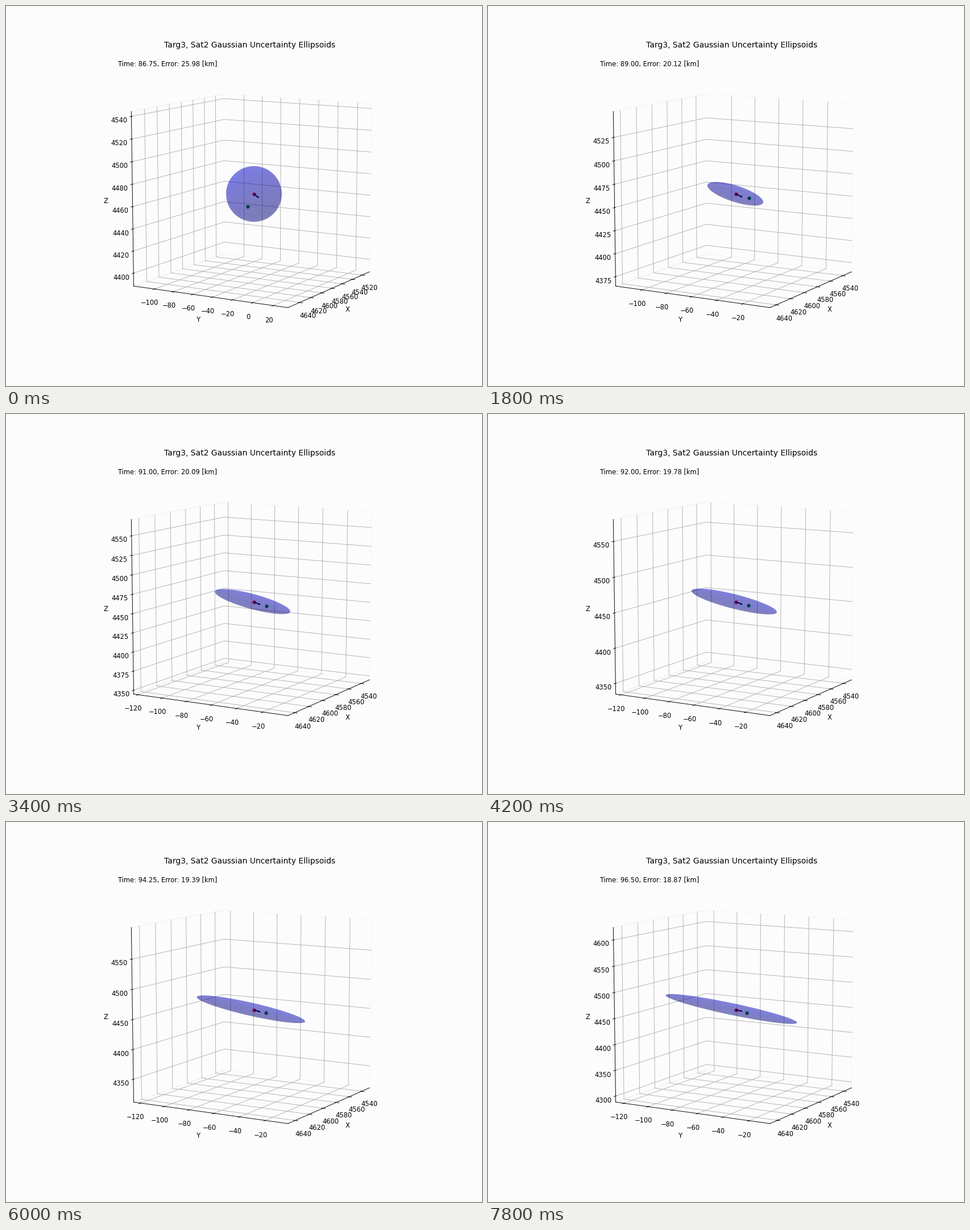
A matplotlib script that plays this animation: 837x669 px, repeating every 8 s.

```python
import numpy as np
import matplotlib.pyplot as plt
from matplotlib.animation import FuncAnimation
from matplotlib.ticker import FixedLocator, MaxNLocator

WIDTH, HEIGHT, DPI = 837, 669, 83.2
FRAMES, INTERVAL = 40, 200
START, STEP = 86.75, 0.25
ELEV, AZIM = 10, 30
BOX = 0.55          # half side of the drawn cube
PX = 278.45         # pixels per cube unit at the centre
MARGIN = 24 / 25    # part of the box that carries ticks

# a few readings of the error after the first filter update
ERROR_STEPS = [1, 5, 12, 17, 21, 30, 39]
ERRORS = [20.02, 20.07, 20.15, 20.09, 19.78, 19.39, 18.87]

e, a = np.radians([ELEV, AZIM])
VIEW = np.array([   # rows: right, up, towards the camera
    [-np.sin(a), np.cos(a), 0],
    [-np.sin(e) * np.cos(a), -np.sin(e) * np.sin(a), np.cos(e)],
    [np.cos(e) * np.cos(a), np.cos(e) * np.sin(a), np.sin(e)],
])

u, w = np.meshgrid(np.linspace(0, 2 * np.pi, 41),
                   np.linspace(0, np.pi, 31), indexing="ij")
SPHERE = np.tensordot(VIEW, np.array(
    [np.cos(u) * np.sin(w), np.sin(u) * np.sin(w), np.cos(w)]), 1)


def prior():
    """Spherical first guess, before any measurement."""
    return dict(centre=np.array([4582.6, -44.0, 4466.3]),
                half=np.full(3, 78.1),
                axes=49 * np.eye(3),
                truth=[-10.5, -22, 0],
                tip=[8.2, -6.5, 4],
                error=25.98)


def estimate(k):
    """Filtered state: the long axis keeps growing along the line of sight.

    centre and half are in km, the rest in camera-space pixels.
    """
    wide = 61.4
    tall = 70.6 + 2.49 * k + 6 * np.exp(-k / 5)
    long_axis = [25 + 2.27 * k, -13 - 0.29 * k, -25 - 4.4 * k]
    return dict(centre=np.array([4585.4 + 0.56 * k ** 0.5,
                                 -58.09 - 0.57 * k ** 0.7,
                                 4459.4 - 0.09 * k]),
                half=np.array([wide, wide, tall]),
                axes=np.array([long_axis, [0, 15 - 0.135 * k, 0],
                               [18.5, 0, 0]]).T,
                truth=[23.3 - 0.0029 * k ** 2, -8.3 + 0.09 * k, 0],
                tip=[10.8, -6.2 + 0.1 * k, 4],
                error=np.interp(k, ERROR_STEPS, ERRORS))


fig = plt.figure(figsize=((WIDTH + 0.01) / DPI, (HEIGHT + 0.01) / DPI),
                 dpi=DPI, facecolor="#fcfcfc")
ax = fig.add_subplot(projection="3d", computed_zorder=False,
                     facecolor="#fcfcfc")
ax.set_box_aspect((1, 1, 1))
ax.view_init(ELEV, AZIM)
ax.set_title("Targ3, Sat2 Gaussian Uncertainty Ellipsoids")
ax.set(xlabel="X", ylabel="Y", zlabel="Z")
AXES = (ax.xaxis, ax.yaxis, ax.zaxis)
SETTERS = (ax.set_xlim, ax.set_ylim, ax.set_zlim)
for axis in AXES:
    axis.pane.fill = False
note = ax.text2D(0.05, 0.95, "", transform=ax.transAxes)
locator = MaxNLocator(9, steps=[1, 2, 2.5, 5, 10])
parts = []


def set_range(axis, set_lim, mid, half):
    lo, hi = mid - half * MARGIN, mid + half * MARGIN
    ticks = locator.tick_values(lo, hi)
    axis.set_major_locator(FixedLocator(ticks[(ticks >= lo) & (ticks <= hi)]))
    set_lim(mid - half, mid + half)


def update(k):
    while parts:
        parts.pop().remove()
    s = estimate(k) if k else prior()
    centre, half = s["centre"], s["half"]

    def to_offset(view):
        cube = np.tensordot(VIEW.T, np.asarray(view) / PX, 1)
        return (cube.T * half / BOX).T

    def to_data(view):
        return (to_offset(view).T + centre).T

    for item in zip(AXES, SETTERS, centre, half):
        set_range(*item)

    dot = dict(depthshade=False, zorder=2)
    parts.extend([
        ax.scatter(*centre, color="r", **dot),
        ax.scatter(*to_data(s["truth"]), color="g", **dot),
        ax.quiver(*centre, *to_offset(s["tip"]), color="k", zorder=3),
        ax.plot_surface(*to_data(np.tensordot(s["axes"], SPHERE, 1)),
                        color="b", alpha=0.3, linewidth=0,
                        antialiased=True, zorder=4),
    ])
    note.set_text(f"Time: {START + STEP * k:.2f}, "
                  f"Error: {s['error']:.2f} [km]")
    return parts


anim = FuncAnimation(fig, update, frames=FRAMES, interval=INTERVAL,
                     init_func=lambda: update(0), repeat_delay=0, blit=False)
plt.show()
```
